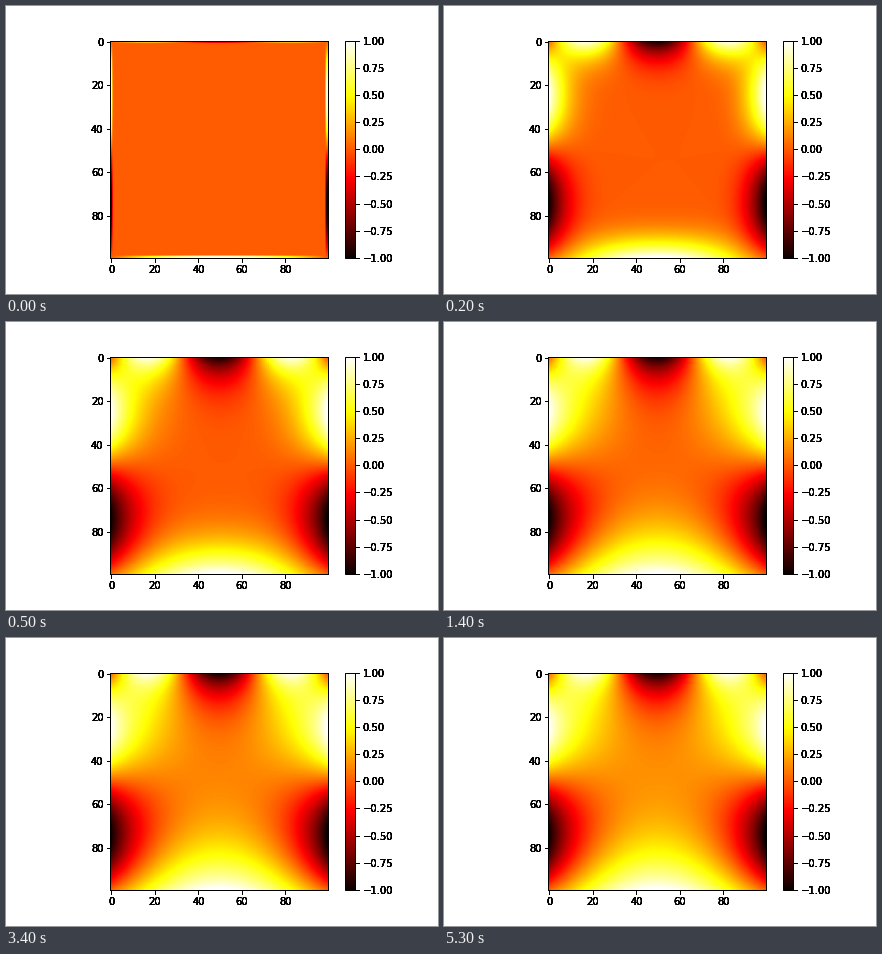
Recreate the animation shown at these times as a matplotlib script. Size 432 by 288 pixels, loop 5600 ms.

```python
import numpy as np
import matplotlib.pyplot as plt
from matplotlib.animation import FuncAnimation

N = 100               # grid points per side
FRAMES = 56
INTERVAL = 100        # ms
SWEEPS = 50           # relaxation sweeps per frame
STACK = 8             # overlaid tick labels, gives the heavy lettering


def start_field():
    s = np.linspace(0, 1, N)
    u = np.zeros((N, N))
    u[:, 0] = u[:, -1] = np.sin(2 * np.pi * s)
    u[0] = np.sin(3 * np.pi * s)
    u[-1] = np.sin(np.pi * s)
    return u


# A Gauss-Seidel pass along one row is a lower triangular product.
gap = np.subtract.outer(np.arange(N - 2), np.arange(N - 2))
ROW = np.where(gap >= 0, 0.25 ** (np.maximum(gap, 0) + 1.0), 0)


def sweep(u):
    for i in range(1, N - 1):
        c = u[i - 1, 1:-1] + u[i + 1, 1:-1]
        c += u[i, 2:]
        c[0] += u[i, 0]
        u[i, 1:-1] = ROW @ c


def relax():
    u = start_field()
    fields = [u.copy()]
    while len(fields) < FRAMES:
        for _ in range(SWEEPS):
            sweep(u)
        fields.append(u.copy())
    return fields


fields = relax()

plt.rcParams.update({"font.family": "DejaVu Sans", "font.size": 10,
                     "axes.linewidth": 1})
fig, ax = plt.subplots(figsize=(6, 4), dpi=72, facecolor="white")
fig.subplots_adjust(left=0.125, right=0.9, bottom=0.125, top=0.88)
image = ax.imshow(fields[0], cmap="hot", vmin=-1, vmax=1)
bar = fig.colorbar(image, ax=ax)

ticks = np.repeat(np.arange(0, N, 20), STACK)
ax.set_xticks(ticks)
ax.set_yticks(ticks)
bar.set_ticks(np.repeat(np.linspace(-1, 1, 9), STACK))


def update(k):
    image.set_data(fields[k])
    return [image]


anim = FuncAnimation(fig, update, frames=FRAMES, interval=INTERVAL,
                     repeat=True, repeat_delay=0)
plt.show()
```
